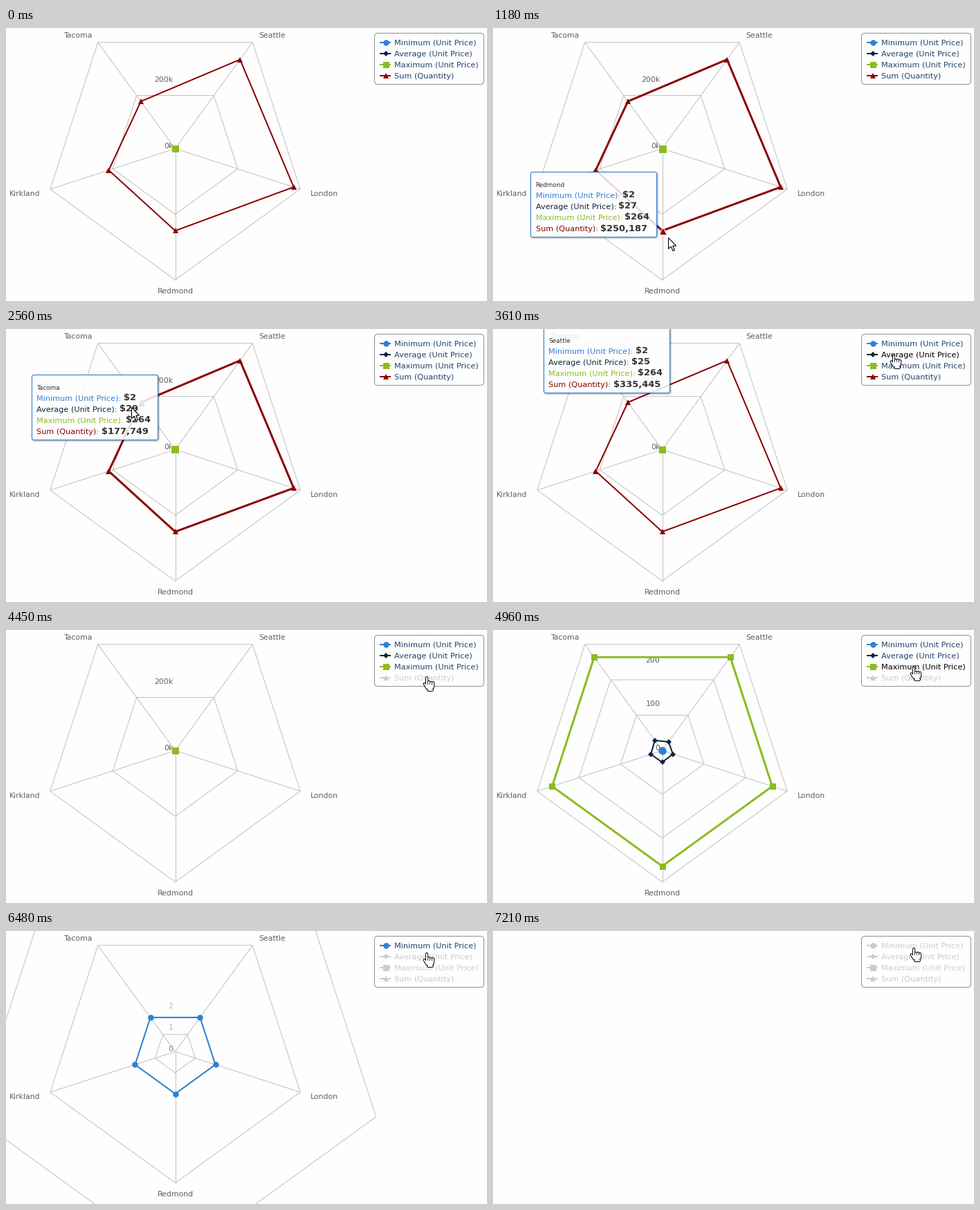
A matplotlib script that plays this animation: 695x395 px, repeating every 8 s.

```python
import math
import numpy as np
import matplotlib.pyplot as plt
from matplotlib.animation import FuncAnimation
from matplotlib.patches import FancyBboxPatch, Polygon

W, H, DPI = 695, 395, 100
LOOP, STEP = 8000, 40
PX = 72 / DPI                      # points per pixel
plt.rcParams["font.family"] = "DejaVu Sans"

CENTER, RADIUS = np.array([244.5, 174.5]), 190
CITIES = ["Seattle", "London", "Redmond", "Kirkland", "Tacoma"]
ANGLES = np.radians(-54 + 72 * np.arange(5))
DIRS = np.column_stack([np.cos(ANGLES), np.sin(ANGLES)])

# name, colour, marker, marker size, values per city
SERIES = [
    ("Minimum (Unit Price)", "#2f7ed8", "o", 8.5, [2] * 5),
    ("Average (Unit Price)", "#0d233a", "D", 6, [24.6, 25.7, 26.7, 27.2, 28.8]),
    ("Maximum (Unit Price)", "#8bbc21", "s", 9, [264] * 5),
    ("Sum (Quantity)", "#8b0000", "^", 8.5,
     [335445, 378921, 250187, 212653, 177749]),
]

# each click in the legend hides the last visible series
CLICKS, RESCALE = (4440, 5320, 6240, 7200), 520
TIP_W, TIP_H, CHASE, FADE_END = 183, 95, 85, 4200
CHART_EDGE = 430

# pointer stops: time, x, y
PATH = [(120, 666, 110), (520, 420, 170), (1000, 309, 265), (1160, 253, 303),
        (1240, 253, 303), (1560, 197, 242), (2160, 57, 113), (2520, 181, 113),
        (2640, 181, 113), (2840, 244, 46), (3440, 413, 40), (3600, 578, 36),
        (3880, 607, 66.5)]
for k, click in enumerate(CLICKS[:3]):
    PATH += [(click, 607, 66.5 - 14.5 * k),
             (click + RESCALE, 607, 52 - 14.5 * k)]
PATH = np.array(PATH)
ARROW = np.array([(0, 0), (0, 16), (3.7, 12.6), (6.5, 19), (9, 18),
                  (6.3, 11.8), (11, 11.6)])

fig = plt.figure(figsize=(W / DPI, H / DPI), dpi=DPI, facecolor="#fefefe")
ax = fig.add_axes([0, 0, 1, 1])
ax.set_xlim(0, W)
ax.set_ylim(H, 0)
ax.axis("off")
live = []


def keep(artist):
    live.append(artist)
    return artist


def text(x, y, s, size, color, z, **style):
    return keep(ax.text(x, y, s, size=size * PX, color=color, va="baseline",
                        zorder=z, **style))


def line(pts, color, width, z, cap="butt"):
    pts = np.asarray(pts)
    keep(ax.plot(pts[:, 0], pts[:, 1], color=color, lw=width * PX, zorder=z,
                 solid_joinstyle="round", solid_capstyle=cap)[0])


def marks(pts, shape, color, size, z, edge=0):
    pts = np.atleast_2d(pts)
    keep(ax.plot(pts[:, 0], pts[:, 1], ls="none", marker=shape,
                 ms=size * PX, mfc=color, mec="white" if edge else color,
                 mew=edge * PX, zorder=z)[0])


def box(x, y, w, h, r, z, **style):
    shape = FancyBboxPatch((x, y), w, h, zorder=z,
                           boxstyle=f"round,pad=0,rounding_size={r}", **style)
    keep(ax.add_patch(shape))


def ring(radii):
    pts = CENTER + DIRS * np.reshape(radii, (-1, 1))
    return np.vstack([pts, pts[:1]])


def nice_axis(values):
    """Axis maximum and a round tick step that suit the values."""
    top = 1.05 * max(values)
    raw = top / 2.6
    power = 10 ** math.floor(math.log10(raw))
    norm = raw / power
    step = power * (1 if norm < 1.5 else 2 if norm < 3.5 else
                    5 if norm < 7.5 else 10)
    return math.ceil(top / step) * step, step


AXES = [nice_axis(s[4]) for s in reversed(SERIES)]


def pointer(t):
    return np.array([np.interp(t, PATH[:, 0], PATH[:, c]) for c in (1, 2)])


def replay_tips():
    """Tooltip corner and city per frame: it chases the hovered spoke."""
    tips, pos, goal, city = [], None, None, None
    for t in range(0, LOOP, STEP):
        p = pointer(t)
        if p[0] < CHART_EDGE:
            near = int(np.argmax(DIRS @ (p - CENTER)))
            if near != city:
                city = near
                reach = RADIUS * SERIES[3][4][city] / AXES[0][0]
                mean_x = CENTER[0] + DIRS[city, 0] * reach / 4
                goal = np.array([mean_x - 12 - TIP_W, p[1] - TIP_H / 2])
                pos = goal if pos is None else pos
            pos = goal + (pos - goal) * math.exp(-STEP / CHASE)
        tips.append((pos, city))
    return tips


TIPS = replay_tips()


def draw_grid(old, new, e, scale):
    for d in DIRS:
        line([CENTER, CENTER + RADIUS * d], "#c0c0c0", 1, 1)
    line(ring([RADIUS] * 5), "#c0c0c0", 1, 1)
    sets = [(new, e)] + ([(old, 1 - e)] if e < 1 else [])
    for (top, step), alpha in sets:
        for v in np.arange(0, top, step):
            r = scale(v)
            if r > 900:
                continue
            line(ring([r] * 5), "#c0c0c0", 1, 1)
            name = f"{v / 1000:.0f}k" if top > 1000 else f"{v:.0f}"
            text(241.5, CENTER[1] - r - 1, name, 11, "#606060", 2,
                 ha="right", alpha=alpha)
    for name, d in zip(CITIES, DIRS):
        x, y = CENTER + d * (RADIUS + 15)
        side = "center" if abs(d[0]) < 0.1 else "left" if d[0] > 0 else "right"
        text(x, y + 5, name, 10.9, "#606060", 2, ha=side)


def draw_series(scale, shown, active, city):
    for i, (_, color, shape, size, values) in enumerate(SERIES[:shown]):
        pts = ring([scale(v) for v in values])
        z = 3 + i * 0.1
        line(pts, color, 3 if i == active else 2, z)
        marks(pts[:5], shape, color, size, z + 0.05)
        if city is not None:
            marks(pts[city], shape, color, size + 2.5, z + 0.06, 1)


def draw_legend(shown, hover):
    box(532.5, 7.5, 158, 74, 5, 5, fc="none", ec="#909090", lw=PX)
    for i, (name, color, shape, size, _) in enumerate(SERIES):
        y = 21 + 16 * i
        ink = "black" if i == hover else "#23446a"
        if i >= shown:
            color = ink = "#cccccc"
        line([(540, y), (556, y)], color, 2, 5)
        marks((548.5, y), shape, color, size, 5.1)
        text(561, y + 3.6, name, 11.25, ink, 5.1)


def draw_tip(pos, city, a):
    x, y = np.floor(pos + (0.5, 0)) + 0.5
    w, h = TIP_W - 1, TIP_H - 1
    for width in (5, 3, 1):
        box(x + 1, y + 1, w, h, 3, 6, fc="none", ec="black", lw=width * PX,
            alpha=(0.175 - 0.025 * width) * a)
    box(x, y, w, h, 3, 6.1, fc="white", ec="none", alpha=0.85 * a)
    box(x, y, w, h, 3, 6.2, fc="none", ec="#2f7ed8", lw=PX, alpha=a)
    text(x + 7, y + 21, CITIES[city], 8.9, "#333333", 7, alpha=a)
    for i, (name, color, _, _, values) in enumerate(SERIES):
        base = y + 37 + 16 * i
        label = text(x + 7, base, name + ":", 11.2, color, 7, alpha=a)
        end = x + 7 + label.get_window_extent().width
        text(end + 3, base, f"${values[city]:,.0f}", 13, "#333333", 7,
             alpha=a, weight="bold")


def draw_arrow(tip):
    keep(ax.add_patch(Polygon(tip + ARROW, closed=True, fc="white",
                              ec="black", lw=1.1 * PX, zorder=9)))


def draw_hand(tip):
    """Rounded strokes, first in black, then thinner in white."""
    strokes = [((3 * k, 2 if k == 0 else 7.5 + 0.5 * k), (3 * k, 14), 2.2)
               for k in range(4)]
    strokes += [((-3, 10.8), (0.5, 15.5), 2), ((1.9, 14.5), (7.1, 14.5), 6),
                ((2, 18.5), (7, 18.5), 3)]
    for color, extra, z in (("black", 2, 9), ("white", 0, 9.1)):
        for a, b, width in strokes:
            line([tip + a, tip + b], color, width + extra, z, "round")


def draw(i):
    t = i * STEP
    while live:
        live.pop().remove()

    past = [c for c in CLICKS if c <= t]
    shown = len(SERIES) - len(past)
    p = pointer(t)
    over_chart = p[0] < CHART_EDGE
    pos, city = TIPS[i]
    hover = 3 if over_chart else None
    if t > CLICKS[0] or (city is not None and p[0] > 540):
        hover = int(np.clip((p[1] - 12.5) // 16, 0, 3))

    if shown:
        k = len(past)
        old, new = AXES[max(k - 1, 0)], AXES[k]
        done = min((t - past[-1]) / RESCALE, 1) if past else 1
        e = 0.5 - math.cos(math.pi * done) / 2

        def scale(v):
            return RADIUS * v * ((1 - e) / old[0] + e / new[0])

        draw_grid(old, new, e, scale)
        draw_series(scale, shown, hover, city if over_chart else None)
    draw_legend(shown, None if over_chart else hover)
    fade = np.clip((FADE_END - t) / 120, 0, 1)
    if city is not None and fade > 0:
        draw_tip(pos, city, fade)
    if t >= PATH[0, 0]:
        (draw_hand if p[0] > 533 and t > 3000 else draw_arrow)(p + 0.5)
    return live


anim = FuncAnimation(fig, draw, frames=LOOP // STEP, interval=STEP,
                     init_func=lambda: [], repeat=True, repeat_delay=0)
plt.show()
```
